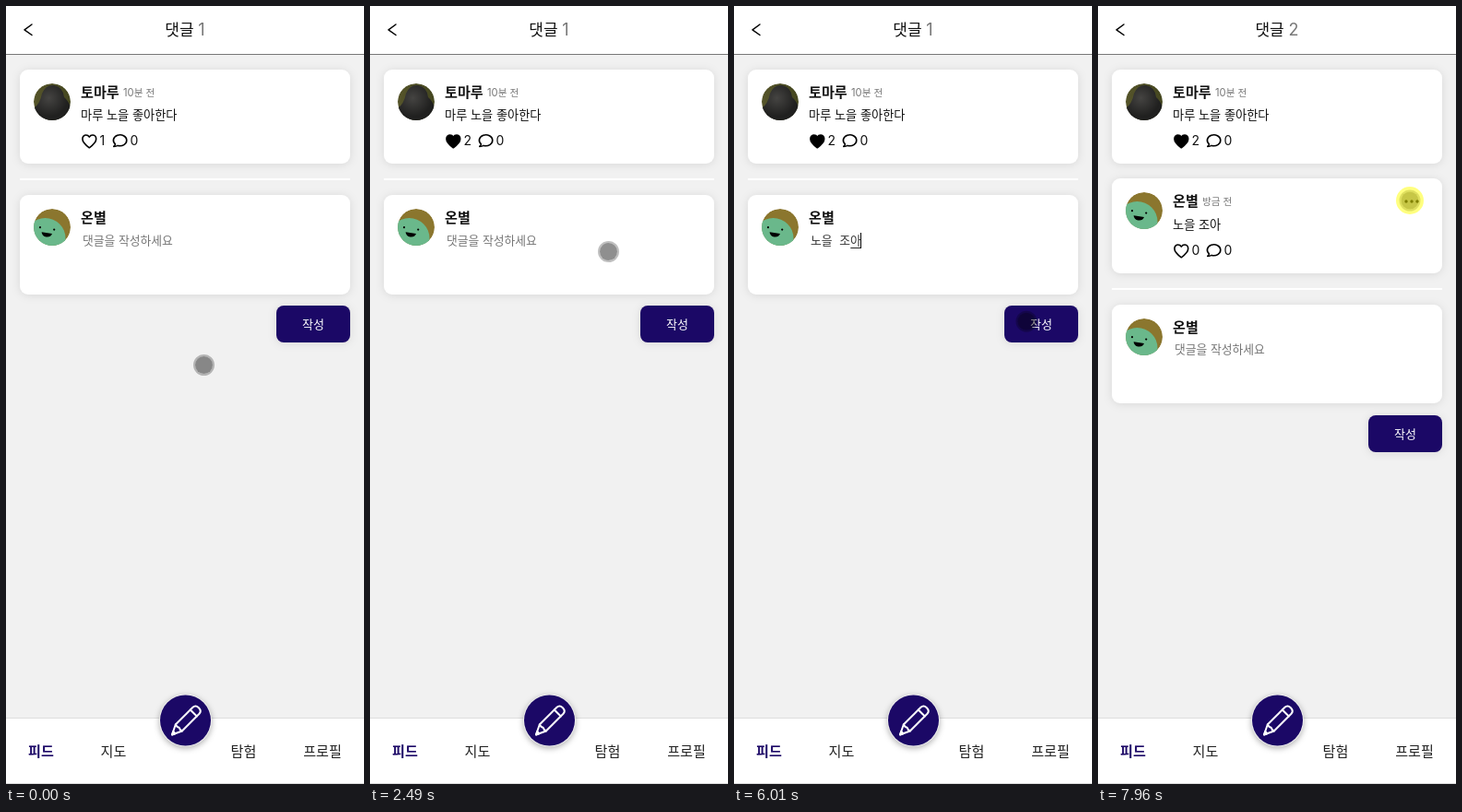
An HTML page for the animation above (8000 ms loop, 388x844 px).

```html
<!DOCTYPE html>
<html lang="ko">
<head>
<meta charset="utf-8">
<style>
html, body { margin: 0; width: 100%; height: 100%; overflow: hidden; background: #f1f1f1; }
svg { display: block; width: 388px; height: 844px; }
text { font-family: "Noto Sans CJK KR", "Noto Sans KR", "Noto Sans CJK", "Noto Sans CJK JP", sans-serif; white-space: pre; }
.num { font-family: Inter, sans-serif; }
.typed { font-family: "Liberation Mono", "Noto Sans CJK KR", "Noto Sans CJK JP", monospace; }
.b { font-weight: 700; }
.m { font-weight: 500; }
.mid { text-anchor: middle; }
.card { fill: #fff; filter: drop-shadow(0 1px 5px rgba(0,0,0,.1)); }
.round { filter: drop-shadow(0 2px 3px rgba(0,0,0,.3)); }
.line { fill: none; stroke: #000; stroke-width: 1.6; stroke-linejoin: round; stroke-linecap: round; }
</style>
</head>
<body>
<svg id="stage" viewBox="0 0 388 844"></svg>
<script>
const LOOP = 8000, NAVY = '#1b0866', ME = '온별';
const LIKED = 1270, TYPING = 3480, BLUR = 6270, POSTED = 6410;

// Pointer stops: time, x, y
const path = [
  [30, 214.5, 389.5], [530, 86.5, 146.5], [660, 86.5, 146.5], [800, 88.5, 143.5],
  [1620, 88.5, 143.5], [1870, 127.5, 238.5], [2430, 193.5, 259.5],
  [2489, 193.5, 259.5], [2490, 258.5, 266.5], [5230, 258.5, 266.5],
  [5350, 254.5, 261.5], [5490, 257.5, 259.5], [6200, 321.5, 348.5],
  [6560, 321.5, 348.5], [6680, 316.5, 468.5], [6910, 315.5, 468.5],
  [7760, 333.5, 207.5], [7790, 333.5, 207.5], [7830, 338, 211]
];
const presses = [[1200, 1340], [6270, 6340], [7960, 8000]];
const caretOn = [[2820, 3350], [TYPING, 5020], [5490, BLUR - 250]];

// Typing: time, finished text, syllable being composed
const typing = [
  [3480, '', 'ㄴ'], [3620, '', '노'], [3740, '', '농'], [3810, '노', '으'],
  [3940, '노', '을'], [4070, '노을 ', ''], [4140, '노을 ', 'ㅈ'], [4290, '노을 ', '조'],
  [4420, '노을 ', '종'], [4490, '노을 조', '아'], [BLUR, '노을 조아', '']
];

const within = (spans, t) => spans.some(([a, b]) => t >= a && t < b);
const text = (x, y, size, str, cls = '', fill = '#111') =>
  `<text x="${x}" y="${y}" font-size="${size}" class="${cls}" fill="${fill}">${str}</text>`;
const box = (x, y, w, h, r, attrs) =>
  `<rect x="${x}" y="${y}" width="${w}" height="${h}" rx="${r}" ${attrs}/>`;
const disc = (x, y, r, fill) => `<circle cx="${x}" cy="${y}" r="${r}" fill="${fill}"/>`;
const at = (x, y, body) => `<g transform="translate(${x} ${y})">${body}</g>`;

const defs = `<defs>
  <clipPath id="disc"><circle cx="20" cy="20" r="20"/></clipPath>
  <linearGradient id="olive"><stop stop-color="#55542a"/><stop offset="1" stop-color="#454720"/></linearGradient>
  <radialGradient id="fur" cx=".4" cy=".35"><stop stop-color="#454442"/><stop offset="1" stop-color="#20201f"/></radialGradient>
</defs>`;

const photo = `<g clip-path="url(#disc)">${disc(20, 20, 20, 'url(#olive)')}
  <path d="M0 42V27Q7 22 9 11Q13 1 22 2Q32 4 33 15Q39 20 41 30V42Z" fill="url(#fur)"/></g>`;

const smiley = `<g clip-path="url(#disc)">${disc(20, 20, 20, '#8b762e')}${disc(12.5, 32, 22, '#6ab88b')}
  ${disc(7, 20.2, 1.1, '#000')}${disc(22.2, 22.6, 1.1, '#000')}
  <path d="M8.6 25.2L20 27Q18.3 31.2 13.6 30.5Q9 29.7 8.6 25.2Z"/></g>`;

const heart = full => `<path class="line" style="fill:${full ? '#000' : 'none'}"
  d="M8.3 14.8C3 10.8.9 8.2.9 5.2C.9 2.7 2.7 1 4.8 1C6.3 1 7.5 1.8 8.3 3.1C9.1 1.8 10.3 1 11.8 1C13.9 1 15.7 2.7 15.7 5.2C15.7 8.2 13.6 10.8 8.3 14.8Z"/>`;

const bubble = `<path class="line"
  d="M2.9 11.4A7.2 6 0 1 1 5.7 12.9C4.4 13.6 3 13.9 1.3 13.9C2.2 13.1 2.7 12.3 2.9 11.4Z"/>`;

// k nudges the lower rows of a card by whole pixels
function comment(y, k, pic, name, when, words, likes, liked) {
  const bx = likes === 1 ? 115.5 : 117.5;
  return box(15, y, 358, 102 + k, 9, 'class="card"') + at(30, y + 15, pic)
    + text(81, y + 30, 15.1, name, 'b') + when
    + text(81, y + 54 + k, 13.2, words)
    + at(82, y + 70 + k, heart(liked)) + text(101.5, y + 82 + k, 14, likes, 'num')
    + at(bx, y + 69.5 + k, bubble) + text(bx + 19, y + 82 + k, 14, 0, 'num');
}

function editor(t, posted) {
  const d = posted ? 119 : 0, base = posted ? 377 : 259;
  let s = box(15, 187 + d, 358, 2, 0, 'fill="#fff"')
    + box(15, 205 + d, 358, posted ? 107 : 108, 9, 'class="card"')
    + at(30, 220 + d, smiley) + text(81, 235 + d, 15.1, ME, 'b');
  let caret = 83;
  if (t < TYPING || posted) {
    s += text(83, base, 12.8, '댓글을 작성하세요', '', '#757575');
  } else {
    const [, done, now] = typing.filter(k => k[0] <= t).pop();
    for (const c of done + now) caret += c === ' ' ? 7.68 : 11.78;
    s += text(83, base, 12.8, done + now, 'typed', '#333');
    if (now) s += box(caret - 11.5, 262, 11.5, 1, 0, 'fill="#222"');
  }
  if (within(caretOn, t)) s += box(Math.floor(caret), 246, 1, 17, 0, 'fill="#000"');
  return s + box(293, 325 + d, 80, 40, 8, `class="card" style="fill:${NAVY}"`)
    + text(333, 350 + d, 13, '작성', 'm mid', '#fff');
}

const bars = count => box(0, 0, 388, 52, 0, 'fill="#fff"') + box(0, 52, 388, 1, 0, 'fill="#777"')
  + '<path class="line" style="stroke-width:1.5" d="M28 20L20 25.8L28 31.5"/>'
  + `<text x="194" y="32" font-size="17" class="m mid" fill="#111">댓글 <tspan class="num" font-size="18" font-weight="400" fill="#777">${count}</tspan></text>`
  + box(0, 772, 388, 72, 0, 'fill="#fff"') + box(0, 772, 388, 1, 0, 'fill="#ddd"')
  + box(0, 843, 388, 1, 0, 'fill="#ddd"')
  + [[38, '피드'], [116.5, '지도'], [257.5, '탐험'], [343, '프로필']].map(([x, s], i) =>
      text(x, 814, 15.1, s, i ? 'mid' : 'mid b', i ? '#222' : NAVY)).join('')
  + `<g class="round">${disc(194.5, 775, 28.5, '#eee')}${disc(194.5, 775, 27.5, NAVY)}</g>
  <g class="line" style="stroke:#fff;stroke-width:2">
    <path d="M180 790.5L183.8 779.5L202.5 760.8Q205.5 758 208.8 761.2Q212.3 764.8 209.5 767.8L190.8 786.5Z"/>
    <path d="M199.8 763.5L206.8 770.5M183.8 779.5Q185.3 782.5 187.6 782.8Q188.3 785.3 190.8 786.5"/>
    <path fill="#fff" d="M180 790.5L181.2 787L183.4 789.3Z"/>
  </g>`;

function pointer(t) {
  let i = path.findIndex(k => k[0] > t), x, y;
  if (i <= 0) {
    [, x, y] = i ? path[path.length - 1] : path[0];
  } else {
    const a = path[i - 1], b = path[i], p = (t - a[0]) / (b[0] - a[0]), e = p * (2 - p);
    x = a[1] + (b[1] - a[1]) * e;
    y = a[2] + (b[2] - a[2]) * e;
  }
  return `<circle cx="${x}" cy="${y}" r="10.5" fill="none" stroke="#000" stroke-opacity=".25" stroke-width="2"/>`
    + disc(x, y, 9.5, 'rgba(0,0,0,.44)')
    + (within(presses, t) ? disc(x, y, 15, 'rgba(255,255,0,.5)') : '');
}

function scene(t) {
  const posted = t >= POSTED, liked = t >= LIKED;
  const ago = text(127, 98, 11.2, '10', 'num', '#777') + text(138.7, 98, 10.6, '분 전', '', '#777');
  let s = defs + bars(posted ? 2 : 1)
    + comment(69, 0, photo, '토마루', ago, '마루 노을 좋아한다', liked ? 2 : 1, liked);
  if (posted) {
    s += comment(187, 1, smiley, ME, text(113, 216, 10.6, '방금 전', '', '#777'), '노을 조아', 0, false)
      + [334, 340, 346].map(x => disc(x, 212, 1.7, '#000')).join('');
  }
  return s + editor(t, posted) + pointer(t);
}

const stage = document.getElementById('stage'), start = performance.now();
let shown = '';
function frame() {
  const s = scene((performance.now() - start) % LOOP);
  if (s !== shown) stage.innerHTML = shown = s;
  requestAnimationFrame(frame);
}
frame();
</script>
</body>
</html>
```
